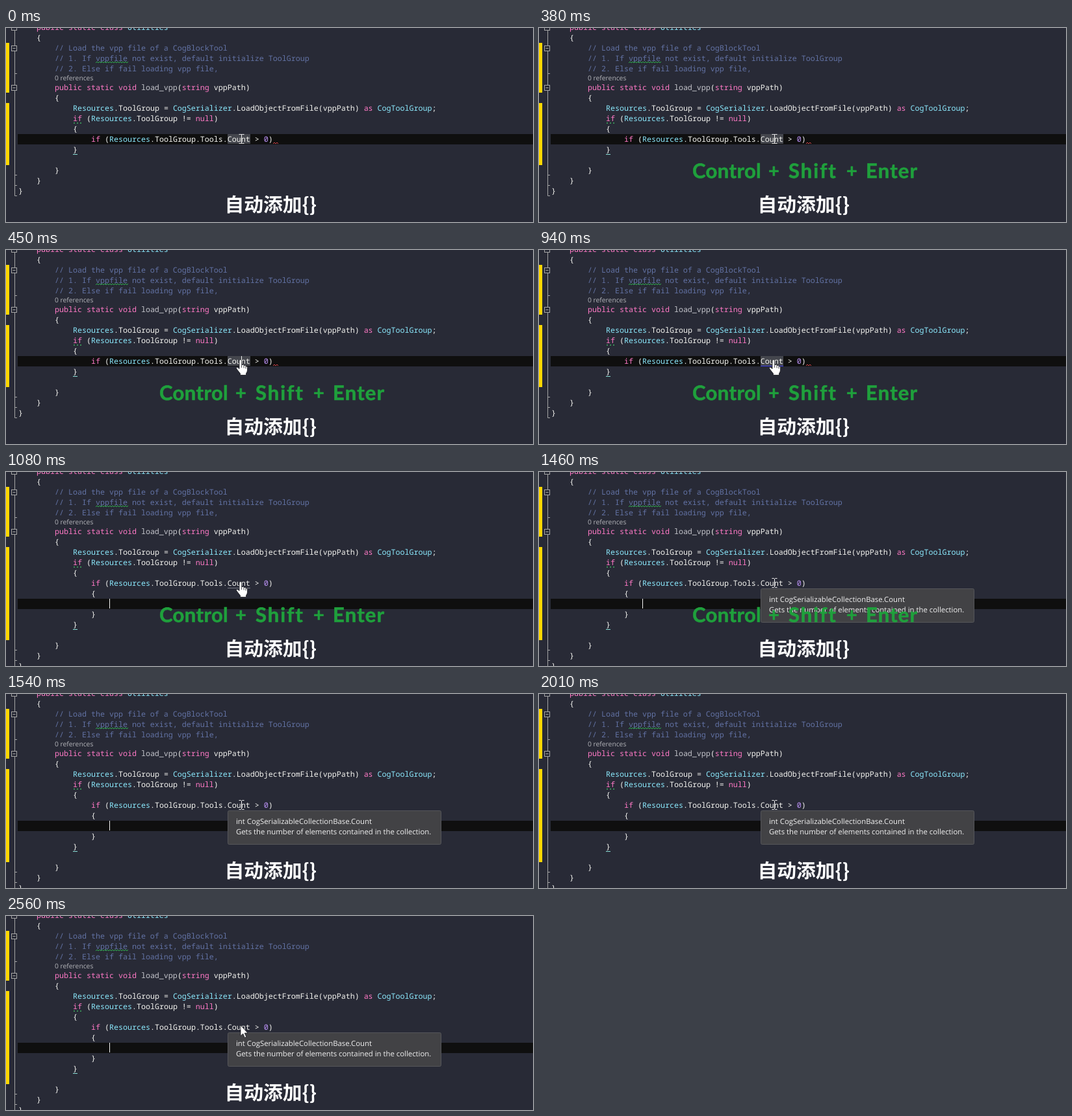
Write an HTML page that moves like this. It is 811x300 px and loops after 2790 ms.

```html
<!DOCTYPE html>
<html lang="zh-CN">
<head>
<meta charset="utf-8">
<title>Auto braces</title>
<style>
html, body { margin: 0; width: 100%; height: 100%; overflow: hidden; background: #282a36; }
svg { display: block; width: 811px; height: 300px; }
text { white-space: pre; text-rendering: geometricPrecision; }
.code { font: 11.6667px "Noto Sans Mono", monospace; fill: #f4f4f0; }
.k { fill: #ff79c6; }
.t { fill: #8be9fd; }
.c { fill: #6272a4; }
.n { fill: #bd93f9; }
.d { fill: #c4c5cb; }
.ui { font-family: "Open Sans", sans-serif; fill: #f1f1f1; }
.keys { font: 700 31px Lato, sans-serif; fill: #1fa03c; stroke: #1fa03c; stroke-width: .6; stroke-linejoin: round; }
.title { font: 700 29.8px "Noto Sans CJK SC", "Noto Sans CJK", sans-serif; fill: #fff; }
.fold { fill: none; stroke: #a5a5a5; }
</style>
</head>
<body>
<svg viewBox="0 0 811 300">
  <rect width="811" height="300" fill="#282a36"/>
  <rect id="line" x="18" width="793" height="16" fill="#0f0f0f"/>
  <rect id="mark" x="341" y="164" width="35" height="15" fill="#44464d"/>
  <g fill="#ffd800">
    <rect y="23" width="5" height="77"/>
    <rect id="bar" y="116" width="5"/>
  </g>
  <path class="fold" d="M13.5 4V27M13.5 36V88M13.5 97V300M13.5 70.5H17"/>
  <g class="fold" id="boxes"></g>
  <g class="code" id="code"></g>
  <text class="ui" x="75" y="81" font-size="10.3" style="fill:#b4b5ba">0 references</text>
  <path id="wave" fill="none" stroke="#2fae4c"/>
  <path d="M104 147h2m3 0h2m3 0h2" stroke="#3fae62" stroke-width="1.5"/>
  <path id="error" fill="none" stroke="#d8454b"/>
  <g id="tail">
    <rect x="6" y="212" width="12" height="140" fill="#282a36"/>
    <path class="fold" d="M13.5 212V259.5H17M13.5 227.5H17M13.5 243.5H17"/>
    <g class="code" id="ends"></g>
    <path d="M103 195.5h7" stroke="#8be0d8"/>
  </g>
  <g class="code" id="block"></g>
  <path id="link" d="M341 179.5h35"/>
  <rect id="caret" width="1" height="15" fill="#f4f4f4"/>
  <g id="tip" class="ui" font-size="11.35">
    <rect x="341.5" y="180.5" width="328" height="52" rx="2" fill="#424245" stroke="#55565a"/>
    <text x="354" y="201">int CogSerializableCollectionBase.Count</text>
    <text x="354" y="217">Gets the number of elements contained in the collection.</text>
  </g>
  <g id="keys" class="keys">
    <text x="236" y="232" letter-spacing=".4">Control</text>
    <text x="353" y="231" font-size="29" style="font-size:29px">+</text>
    <text x="384" y="232" letter-spacing="2">Shift</text>
    <text x="473" y="231" style="font-size:29px">+</text>
    <text x="503" y="232" letter-spacing="1.2">Enter</text>
  </g>
  <text class="title" x="336.4" y="284">自动添加{}</text>
  <path id="beam" d="M358.5 164.5h3l1 1 1-1h3M362.5 165v13M358.5 178.5h3l1-1 1 1h3" fill="none" stroke="#f2f2f2"/>
  <g id="hand" stroke="#17181d" stroke-width=".8">
    <path d="M359 171.500q0-2 1.800-2t1.800 2v6q3-.8 3.400 1 2.600-.6 3 1.200 2.500-.3 2.500 1.800v4.500q0 2-2 5v2.500h-9v-2.500l-5.500-7q-1.200-2.200.6-2.600 1.500-.1 3.400 2.300z" fill="#fff"/>
    <path d="M362.600 178v4M366 179v3.500M369 180v3.500" fill="none"/>
  </g>
  <path id="arrow" d="M361 169v16.500l3.700-3.500 2.700 6.200 2.500-1.100-2.700-6h5z" fill="#fff" stroke="#17181d" stroke-width=".8"/>
</svg>
<script>
const LOOP = 2790;
const $ = id => document.getElementById(id);

// Pairs of colour class and text, laid out as one line of code
function row(x, y, ...parts) {
  let spans = '';
  for (let i = 0; i < parts.length; i += 2)
    spans += `<tspan class="${parts[i]}">${parts[i + 1].replace(/</g, '&lt;')}</tspan>`;
  return `<text x="${x}" y="${y}">${spans}</text>`;
}

const zigzag = (x, y, n) => `M${x} ${y}` +
  Array.from({ length: n }, (_, i) => `l2 ${i % 2 ? 2 : -2}`).join('');

$('code').innerHTML = [
  row(47, 3, 'k', 'public static class ', 't', 'Utilities'),
  row(47, 19, '', '{'),
  row(75, 35, 'c', '// Load the vpp file of a CogBlockTool'),
  row(75, 51, 'c', '// 1. If vppfile not exist, default initialize ToolGroup'),
  row(75, 67, 'c', '// 2. Else if fail loading vpp file,'),
  row(75, 96, 'k', 'public static void ', 'd', 'load_vpp', '', '(', 'k', 'string', '', ' vppPath)'),
  row(75, 112, '', '{'),
  row(103, 128, 't', 'Resources', '', '.ToolGroup = ', 't', 'CogSerializer',
    '', '.LoadObjectFromFile(vppPath) ', 'k', 'as ', 't', 'CogToolGroup', '', ';'),
  row(103, 144, 'k', 'if ', '', '(', 't', 'Resources', '', '.ToolGroup != ', 'k', 'null', '', ')'),
  row(103, 160, '', '{'),
  row(131, 176, 'k', 'if ', '', '(', 't', 'Resources', '', '.ToolGroup.Tools.Count > ', 'n', '0', '', ')')
].join('');

$('ends').innerHTML = [[103, 192], [75, 224], [47, 240], [19, 256]]
  .map(([x, y]) => row(x, y, '', '}')).join('');
$('block').innerHTML = row(131, 192, '', '{') + row(131, 224, '', '}');
$('boxes').innerHTML = [-4.5, 27.5, 88.5].map(y =>
  `<rect x="8.5" y="${y}" width="8" height="8"/><path d="M10.5 ${y + 4}h4"/>`).join('');
$('wave').setAttribute('d', zigzag(138, 54, 25));
$('error').setAttribute('d', zigzag(411, 179, 4));

const show = (id, on) => $(id).setAttribute('visibility', on ? 'visible' : 'hidden');
const within = (t, a, b) => t >= a && t < b;

function draw(t) {
  const open = t >= 1080;
  const hand = within(t, 450, 610) || within(t, 680, 1460);
  const arrow = t >= 2470;

  $('line').setAttribute('y', open ? 196 : 164);
  $('bar').setAttribute('height', open ? 144 : 96);
  $('tail').setAttribute('transform', `translate(0 ${open ? 48 : 0})`);
  show('block', open);
  show('mark', !open);
  show('error', !open);

  $('caret').setAttribute('x', open ? 159 : 362);
  $('caret').setAttribute('y', open ? 196 : 164);
  show('caret', !within(t, 940, 1080) && !within(t, 2010, 2560));

  $('link').setAttribute('stroke', open ? '#777983' : '#3a3ae8');
  show('link', within(t, 680, 1460));
  show('hand', hand);
  show('arrow', arrow);
  show('beam', !hand && !arrow);
  show('tip', t >= 1310);
  show('keys', within(t, 380, 1540));
}

const start = performance.now();
function tick() {
  draw((performance.now() - start) % LOOP);
  requestAnimationFrame(tick);
}
tick();
</script>
</body>
</html>
```
